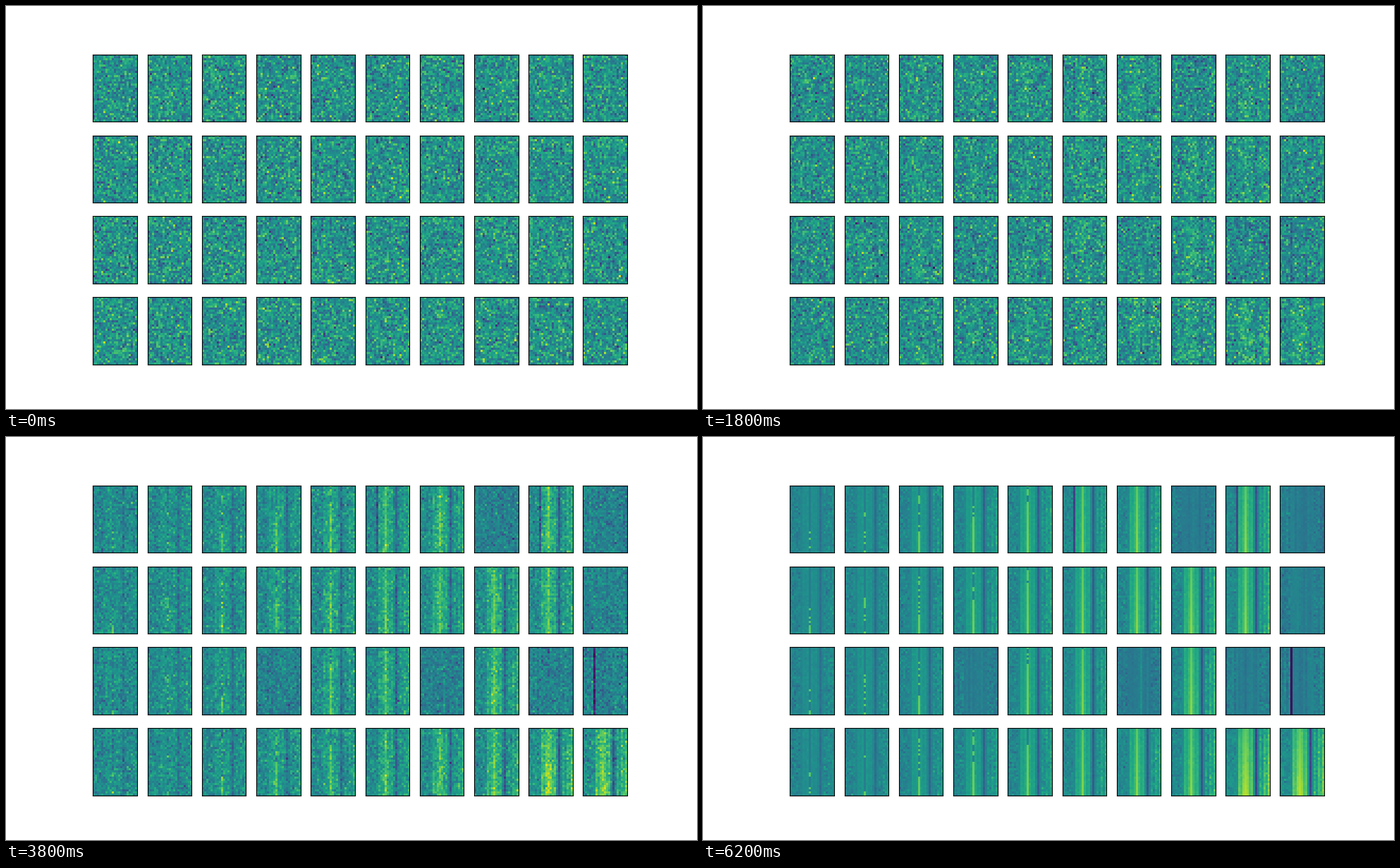
A matplotlib script for the animation above (6.4 s loop, 980 px wide and 572 px high).

```python
import numpy as np
import matplotlib.pyplot as plt
from matplotlib.animation import FuncAnimation

ROWS, COLS, H, W = 4, 10, 32, 21
FRAMES, STEP = 32, 200
SETTLED = 26            # frame at which the noise is gone
PERSISTENCE = 0.8       # share of the noise kept from frame to frame
CENTRE, SHADOW, EDGE = 9, 14, 5
FLAT = {(0, 7), (0, 9), (1, 9), (2, 3), (2, 6), (2, 8), (2, 9)}
EDGE_DEPTH = {(0, 5): .28, (0, 8): .26, (2, 9): .42}

rng = np.random.default_rng(7)
x = np.arange(W)
y = np.arange(H)

ripple = np.cos(np.pi * x)
band = (.21 + .04 * ripple) * np.exp(-((x - CENTRE) / 3.6) ** 8)
right = np.where(x > SHADOW, .03 * (x - SHADOW) + .05 * ripple, 0)
PROFILE = .03 + band + right
SPECKLE = np.where(abs(x - 10) > 5, .04, .013)


def strength(r, c):
    """Stripes get brighter to the right, most of all in the bottom corner."""
    if (r, c) in FLAT:
        return 0
    return min(.2 + .09 * c, .8) + (.35 if r == ROWS - 1 and c >= 8 else 0)


def centre_line(s):
    """Sparse dots that turn into a solid line further down."""
    solid = H * (1.7 - 2.6 * s)
    dots = (y >= solid - 18) & (rng.random(H) < .35)
    return np.where((y >= solid) | dots, .27 + .08 * s, -.03 + .05 * s)


def final_panel(r, c):
    """Offsets from the base level that the panel settles to."""
    s = strength(r, c)
    growth = 1 + .35 * s * (y[:, None] / (H - 1) - .4)
    panel = s * PROFILE * growth + rng.normal(0, SPECKLE, (H, W))
    if s:
        panel[:, SHADOW] -= .04 + .2 * s
        panel[:, CENTRE] = centre_line(s) * growth[:, 0]
    else:
        panel += rng.normal(-.02, .022, W)
    panel[:, EDGE] -= EDGE_DEPTH.get((r, c), 0)
    return panel


def drifting_noise():
    shape = (ROWS * COLS, H, W)
    fields = [rng.normal(size=shape)]
    for _ in range(FRAMES - 1):
        fresh = rng.normal(size=shape)
        fields.append(PERSISTENCE * fields[-1] + np.sqrt(1 - PERSISTENCE ** 2) * fresh)
    return fields


final = np.array([final_panel(r, c) for r in range(ROWS) for c in range(COLS)])
noise = drifting_noise()

fig, axes = plt.subplots(ROWS, COLS, figsize=(9.8, 5.72), dpi=100)
images = []
for ax in axes.flat:
    ax.set(xticks=[], yticks=[])
    images.append(ax.imshow(np.zeros((H, W)), cmap="viridis", vmin=0, vmax=1,
                            interpolation="nearest", aspect=1.003))


def update(frame):
    u = min(frame / SETTLED, 1)
    signal = u * u * (3 - 2 * u)
    sigma = .122 * np.sqrt(1 - signal ** 2)
    level = .515 - .04 * signal - .03 * frame / (FRAMES - 1)
    values = level + signal * final + sigma * noise[frame]
    for image, value in zip(images, values):
        image.set_data(value)
    return images


anim = FuncAnimation(fig, update, frames=FRAMES, interval=STEP, repeat=True,
                     repeat_delay=0, blit=False)
plt.show()
```
